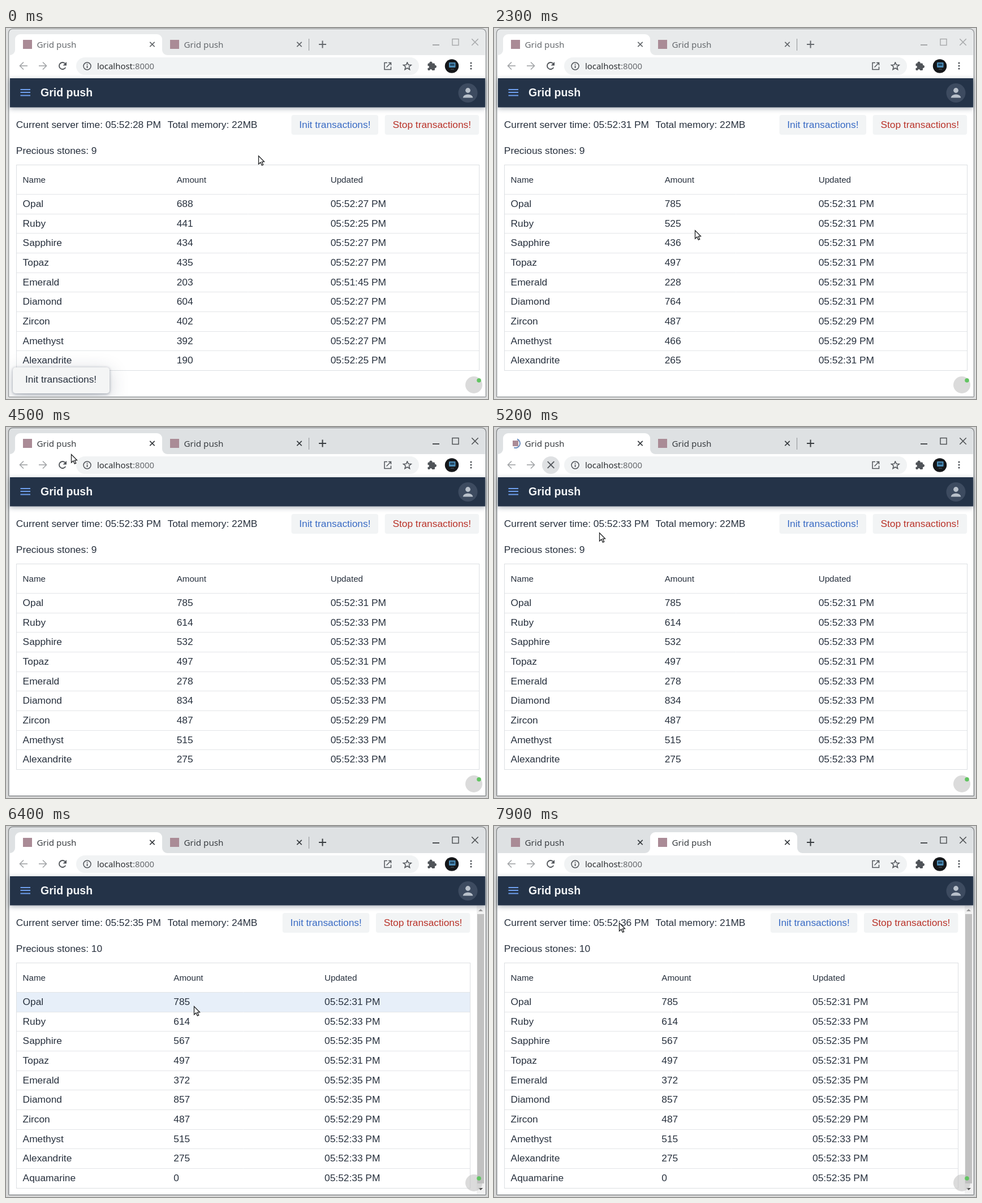
An HTML page with a canvas that plays this animation: 852x657 px, repeating every 8000 ms.

```html
<!DOCTYPE html>
<html lang="en">
<head>
<meta charset="utf-8">
<title>Grid push</title>
<style>
html, body { margin: 0; width: 100%; height: 100%; overflow: hidden; background: #fff; }
canvas { display: block; }
</style>
</head>
<body>
<canvas id="stage" width="852" height="657"></canvas>
<script>
const ctx = document.getElementById('stage').getContext('2d');
const LOOP = 8000, STEP = 100, ROW = 34.67;
const SANS = '"Liberation Sans", Arial, sans-serif';
const BODY = '17.34px ' + SANS, SMALL = '15.17px ' + SANS;
const UI = '"Noto Sans", "Open Sans", sans-serif';
const INK = '#27303d', ICON = '#505459';
const ACTIVATE = 4200, RELOAD = 4800, LOADED = 5900, FILLED = 6100, UNHOVER = 6800, SWITCH = 7300;

// Time of each clock tick; the first one shows second 28.
const ticks = [0, 200, 1200, 2200, 3200, 4200, 5300, 5900, 7300];

// Times of the pushes, then per stone its amount after each push (0 = unchanged).
const pushes = [0, 400, 2300, 4300, FILLED];
const pushSeconds = [27, 29, 31, 33, 35];
const stones = [
  ['Opal', [688, 0, 785, 0, 0]],
  ['Ruby', [441, 461, 525, 614, 0], '52:25'],
  ['Sapphire', [434, 0, 436, 532, 567]],
  ['Topaz', [435, 0, 497, 0, 0]],
  ['Emerald', [203, 0, 228, 278, 372], '51:45'],
  ['Diamond', [604, 699, 764, 834, 857]],
  ['Zircon', [402, 487, 0, 0, 0]],
  ['Amethyst', [392, 466, 0, 515, 0]],
  ['Alexandrite', [190, 0, 265, 275, 0], '52:25']
];

// Pointer path: time, x, y of the tip.
const path = [
  [0, 446, 226], [300, 446, 226], [500, 397, 306], [600, 397, 306], [800, 372, 335],
  [1100, 372, 335], [1400, 355, 358], [3100, 355, 358], [3300, 357, 300], [3600, 354, 149],
  [3800, 300, 30], [4000, 162, 20], [4200, 140, 26], [4400, 130, 34], [4600, 99, 62],
  [4900, 99, 62], [5200, 186, 187], [5600, 270, 268], [6000, 324, 309], [6400, 332, 319],
  [6700, 332, 319], [7000, 342, 150], [7200, 350, 28], [7300, 350, 28], [7600, 298, 297],
  [7900, 221, 171], [8000, 221, 171]
];

function pointerAt(t) {
  const i = path.findIndex(p => p[0] > t);
  const [a, b] = [path[i - 1], path[i]];
  const k = (t - a[0]) / (b[0] - a[0]);
  return [1, 2].map(n => Math.round(a[n] + (b[n] - a[n]) * k));
}

function text(str, x, y, font = BODY, color = INK) {
  ctx.font = font;
  ctx.fillStyle = color;
  ctx.fillText(str, x, y);
}

function rect(x, y, w, h, color) {
  ctx.fillStyle = color;
  ctx.fillRect(x, y, w, h);
}

function round(x, y, w, h, r, color) {
  ctx.fillStyle = color;
  ctx.beginPath();
  ctx.roundRect(x, y, w, h, r);
  ctx.fill();
}

function disc(x, y, r, color) {
  ctx.fillStyle = color;
  ctx.beginPath();
  ctx.arc(x, y, r, 0, 7);
  ctx.fill();
}

function line(points, color, width = 1.6) {
  ctx.strokeStyle = color;
  ctx.lineWidth = width;
  ctx.beginPath();
  points.forEach(([x, y]) => ctx.lineTo(x, y));
  ctx.stroke();
}

function arc(x, y, r, from, to, color, width = 1.6) {
  ctx.strokeStyle = color;
  ctx.lineWidth = width;
  ctx.beginPath();
  ctx.arc(x, y, r, from, to);
  ctx.stroke();
}

function cross(x, y, r, color, width = 1.6) {
  line([[x - r, y - r], [x + r, y + r]], color, width);
  line([[x - r, y + r], [x + r, y - r]], color, width);
}

function withShadow(color, blur, dy, draw) {
  ctx.save();
  ctx.shadowColor = color;
  ctx.shadowBlur = blur;
  ctx.shadowOffsetY = dy;
  draw();
  ctx.restore();
}

function tabShape(x) {
  const r = 9, top = 11, base = 48, right = x + 260;
  ctx.fillStyle = '#fff';
  ctx.beginPath();
  ctx.moveTo(x - r, base);
  ctx.arcTo(x, base, x, base - r, r);
  ctx.arcTo(x, top, x + r, top, r);
  ctx.arcTo(right, top, right, top + r, r);
  ctx.arcTo(right, base, right + r, base, r);
  ctx.lineTo(right + r, base);
  ctx.fill();
}

function drawTabs(t, pointer) {
  const focused = t >= ACTIVATE, second = t >= SWITCH;
  const strip = focused ? '#dee1e3' : '#e8eaeb';
  const ink = focused ? '#383c40' : '#65696d';
  const control = focused ? '#484b4e' : '#a5a7a9';
  const loading = t >= RELOAD && t < LOADED;

  rect(0, 0, 852, 657, focused ? '#d6d7d7' : '#dedfdf');
  round(4, 1, 845, 653, [8, 8, 2, 2], focused ? '#737678' : '#85888a');
  round(5, 2, 843, 651, [7, 7, 1, 1], strip);
  rect(7, 48, 840, 604, '#fff');
  tabShape(second ? 276 : 16);

  [16, 276].forEach((x, i) => {
    const spin = loading && i === 0;
    round(x + (spin ? 17 : 14), spin ? 24 : 21, spin ? 10 : 16, spin ? 10 : 16, 0, '#aa8b96');
    if (spin) {
      const a = -1.2 + (t - 5200) / 1200 * Math.PI * 2;
      arc(38, 29, 8, a, a + 3.1, '#6d8fc0', 2);
    }
    text('Grid push', x + 38.5, 34.5, '15.2px ' + UI, ink);
    cross(x + 242.5, 29, 4.2, ink, 1.7);
  });

  const overSecond = pointer[0] >= 276 && pointer[0] < 536 && pointer[1] < 48;
  if (!second && !overSecond) rect(535, 19, 1, 21, '#909396');
  rect(553, 28, 13, 2, ink);
  rect(558.5, 22.5, 2, 13, ink);

  rect(754, 29, 12, 2, control);
  ctx.strokeStyle = control;
  ctx.lineWidth = 1.4;
  ctx.strokeRect(789, 19.5, 11, 11);
  cross(829, 25, 5.7, control, 1.5);
}

function drawArrow(x, dir) {
  const c = '#a0a3a6';
  line([[x - 7 * dir, 67], [x + 6 * dir, 67]], c);
  line([[x, 60.5], [x + 6.5 * dir, 67], [x, 73.5]], c);
}

function drawToolbar(t) {
  drawArrow(31, -1);
  drawArrow(65, 1);
  if (t >= RELOAD && t < LOADED) {
    disc(100.5, 67.5, 15.5, '#dfe1e3');
    cross(100.5, 67, 5.8, ICON, 1.8);
  } else {
    arc(100, 67, 6, 0.5, 5.5, ICON, 1.9);
    ctx.fillStyle = ICON;
    ctx.beginPath();
    [[107, 60], [107, 66.5], [100.5, 66.5]].forEach(p => ctx.lineTo(...p));
    ctx.fill();
  }

  round(124, 52, 606, 31, 15.5, '#f1f3f4');
  arc(143.5, 67.5, 6.5, 0, 7, ICON, 1.5);
  rect(142.7, 66.5, 1.7, 4.5, ICON);
  rect(142.7, 63.5, 1.7, 1.7, ICON);
  text('localhost', 161, 73, '14.9px ' + UI, '#2b2e31');
  const w = ctx.measureText('localhost').width;
  text(':8000', 161 + w, 73, '14.9px ' + UI, '#66696d');

  line([[674, 61.5], [669, 61.5], [669, 73.5], [680.5, 73.5], [680.5, 68.5]], ICON, 1.5);
  line([[676, 61.5], [680.5, 61.5], [680.5, 66]], ICON, 1.5);
  line([[680, 62], [672.5, 69.5]], ICON, 1.5);

  const star = [];
  for (let i = 0; i <= 10; i++) {
    const a = -Math.PI / 2 + i * Math.PI / 5, r = i % 2 ? 3.2 : 7.3;
    star.push([709.3 + r * Math.cos(a), 67.8 + r * Math.sin(a)]);
  }
  line(star, ICON, 1.5);

  round(745.5, 62.5, 12.5, 12.5, 1.5, ICON);
  disc(751, 62, 2.6, ICON);
  disc(758.3, 68.3, 2.6, ICON);
  disc(746, 69, 2, '#fff');
  disc(751, 75, 2, '#fff');

  disc(788, 67.5, 12.2, '#15171a');
  round(783, 61, 11.5, 9, 1, '#4d8db8');
  rect(785, 63, 7.5, 4, '#234b68');
  rect(786, 72, 6, 2, '#33393e');
  [62, 67, 72].forEach(y => disc(822, y, 1.6, ICON));
}

function drawHeader(t) {
  withShadow('rgba(30,45,70,.35)', 8, 2, () => rect(7, 89, 840, 51.5, '#243348'));
  [109, 114, 119.5].forEach(y => rect(25.5, y - 1, 17.5, 2, '#6fa0ee'));
  text('Grid push', 61, 121, 'bold 19.5px ' + SANS, '#f4f6f8');
  disc(816.5, 115, 17, '#3d4b60');
  disc(816.5, 110.5, 4.4, '#b9c1cb');
  ctx.beginPath();
  ctx.ellipse(816.5, 123.5, 8.8, 6, 0, Math.PI, 0);
  ctx.fill();
  if (t >= 5500 && t < FILLED) {
    rect(7, 89, 840 * Math.min(1, (t - 5400) / 500), 4, '#3b69c2');
  }
}

function drawButton(label, x, w, color) {
  round(x, 154, w, 35, 4, '#f2f4f5');
  text(label, x + 13.8, 177, BODY, color);
}

function drawPage(t) {
  const long = t >= FILLED;
  const second = 27 + ticks.filter(k => k <= t).length;
  const memory = t >= SWITCH ? 21 : t >= LOADED ? 24 : 22;
  const count = long ? 10 : t >= LOADED ? '' : 9;
  const shift = long ? -15.7 : 0;
  const right = long ? 820.5 : 836.5;
  const columnWidth = (right - 18.5) / 3 - .6;
  const columns = [0, 1, 2].map(i => 29.6 + i * columnWidth);
  const rows = long ? 10 : 9;
  const rowTop = i => 294.5 + Math.round(i * ROW);

  text(`Current server time: 05:52:${second} PM`, 17.85, 177);
  text(`Total memory: ${memory}MB`, 285.5, 177);
  text('Precious stones: ' + count, 17.85, 223);
  drawButton('Init transactions!', 504.5 + shift, 153.5, '#386ac4');
  drawButton('Stop transactions!', 669.6 + shift, 166.5, '#b93229');

  if (long && t < UNHOVER) rect(19, 295, right - 19, 34, '#e7eff9');
  ['Name', 'Amount', 'Updated'].forEach((s, i) => text(s, columns[i], 274, SMALL));
  for (let i = 0; i < rows; i++) {
    line([[18.5, rowTop(i)], [right, rowTop(i)]], '#e3e5e8', 1);
    let cells = ['Aquamarine', 0, '52:35'];
    if (i < 9) {
      const [name, amounts, start = '52:27'] = stones[i];
      cells = [name, amounts[0], start];
      amounts.forEach((n, k) => {
        if (k && n && pushes[k] <= t) cells = [name, n, '52:' + pushSeconds[k]];
      });
    }
    cells[2] = `05:${cells[2]} PM`;
    cells.forEach((s, k) => text(s, columns[k], rowTop(i) + 22.5));
  }
  ctx.strokeStyle = '#dcdfe2';
  ctx.lineWidth = 1;
  ctx.strokeRect(18.5, 242.5, right - 18.5, rowTop(rows) - 242.5);
}

function triangle(x, y, dy, color) {
  ctx.fillStyle = color;
  ctx.beginPath();
  [[x - 4, y], [x + 4, y], [x, y + dy]].forEach(p => ctx.lineTo(...p));
  ctx.fill();
}

function drawScrollbar() {
  rect(832, 141, 15, 511, '#f1f1f1');
  rect(833, 156, 12, 477, '#c1c1c1');
  triangle(839, 151, -4, '#9a9a9a');
  triangle(839, 641, 4, '#4d4d4d');
}

function drawToast(t) {
  if (t >= 2200) return;
  const drop = t < 1200 ? 0 : t < 1300 ? 8 : t < 1400 ? 32 : 62;
  ctx.save();
  ctx.beginPath();
  ctx.rect(7, 141, 840, 511);
  ctx.clip();
  const box = () => round(12, 601 + drop, 171, 46, 5, '#f4f5f5');
  withShadow('rgba(30,45,70,.22)', 34, 8, box);
  withShadow('rgba(30,45,70,.4)', 5, 1, box);
  text('Init transactions!', 34, 628 + drop);
  ctx.restore();
}

function drawBadge(t) {
  disc(827, 632, 15, 'rgba(190,190,190,.55)');
  disc(836, 624, 3.8, t >= 5300 && t < LOADED ? '#b5b5b5' : '#62c462');
}

function drawPointer([x, y]) {
  const shape = [[0, 0], [0, 14.5], [3.4, 11.4], [5.8, 16.7], [8.2, 15.6], [5.8, 10.5], [10, 10.2]];
  ctx.beginPath();
  shape.forEach(([dx, dy]) => ctx.lineTo(x + dx + .5, y + dy + .5));
  ctx.closePath();
  ctx.fillStyle = '#fff';
  ctx.fill();
  ctx.strokeStyle = '#202224';
  ctx.lineWidth = 1.3;
  ctx.stroke();
}

function frame(now) {
  const t = Math.floor((now % LOOP) / STEP) * STEP;
  const pointer = pointerAt(t);
  drawTabs(t, pointer);
  drawToolbar(t);
  if (t >= FILLED) drawScrollbar();
  drawHeader(t);
  drawPage(t);
  drawToast(t);
  drawBadge(t);
  drawPointer(pointer);
  requestAnimationFrame(frame);
}

requestAnimationFrame(frame);
</script>
</body>
</html>
```
